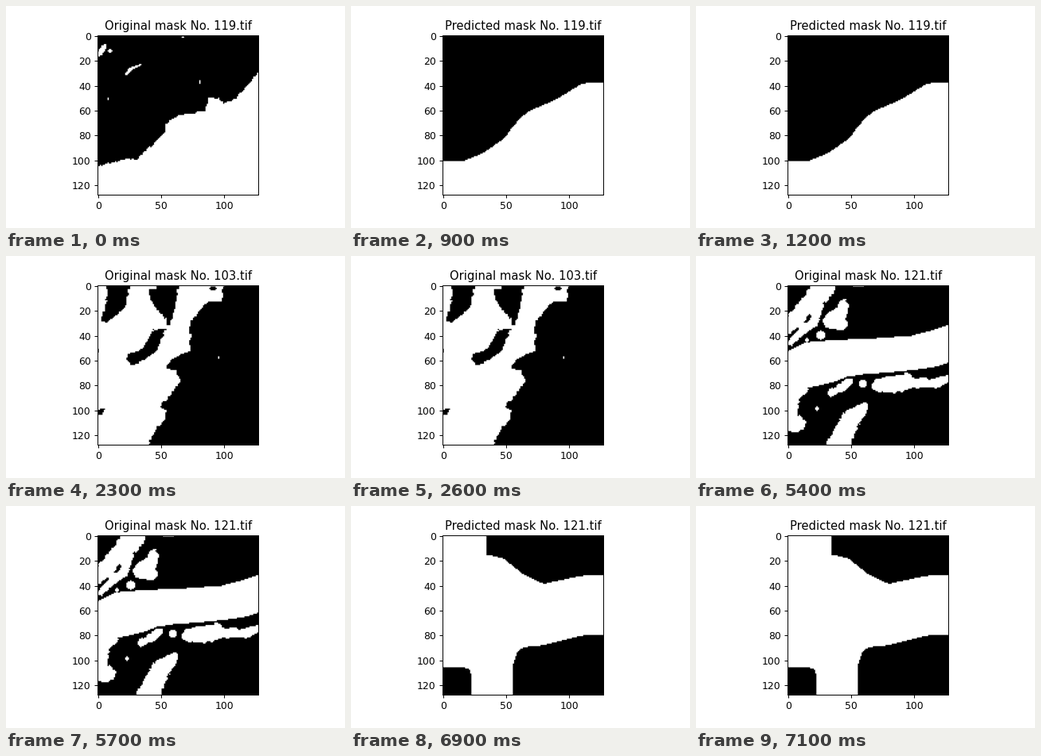
These frames come from a looping animation (426x280 px, 8000 ms). A matplotlib script:

```python
import numpy as np
import matplotlib.pyplot as plt
from matplotlib.animation import FuncAnimation

WIDTH, HEIGHT, DPI = 426, 280, 100
LEFT, RIGHT, TOP, BOTTOM = 115.4, 317.4, 37.1, 237.7
SIZE = 128
SCALE = 0.888          # point sizes relative to the matplotlib defaults
INTERVAL, FRAMES = 100, 80

index = np.arange(SIZE)
rows, cols = np.meshgrid(index, index, indexing="ij")

# Blocky noise that gives hand-labelled outlines their ragged edge
rng = np.random.default_rng(4)
grain = np.kron(rng.uniform(-0.8, 0.8, (43, 43)), np.ones((3, 3)))
grain = grain[:SIZE, :SIZE]


def blank(value):
    return np.full((SIZE, SIZE), float(value))


def curve(*points, smooth=1):
    """Value at each index along (position, value) points, optionally softened."""
    line = np.interp(index, *zip(*points))
    padded = np.pad(line, smooth // 2, mode="edge")
    return np.convolve(padded, np.ones(smooth) / smooth, mode="valid")


def stroke(mask, value, *points, rough=1):
    """Brush through (x, y, radius) points."""
    steps = np.linspace(0, len(points) - 1, 12 * len(points))
    path = [np.interp(steps, range(len(points)), p) for p in zip(*points)]
    for x, y, r in zip(*path):
        mask[np.hypot(cols - x, rows - y) < r + rough * grain] = value


def ellipse(mask, value, x, y, rx, ry, tilt=0):
    c, s = np.cos(np.radians(tilt)), np.sin(np.radians(tilt))
    u, v = cols - x, rows - y
    mask[np.hypot((u * c + v * s) / rx, (v * c - u * s) / ry) < 1] = value


def original_119():
    m = blank(0)
    shore = curve((0, 105), (12, 101), (24, 98.5), (30, 100), (53, 78),
                  (54, 71), (62, 65), (85, 60), (88, 50), (96, 50),
                  (100, 54), (110, 50), (127, 30))
    m[rows > shore + grain] = 1
    ellipse(m, 1, 3, 11.5, 2.2, 5.5, 30)
    ellipse(m, 1, 9.5, 12, 1.6, 2)
    stroke(m, 1, (22.5, 30.5, 1.2), (26, 26.5, 1.2), (34, 23, 0.7), rough=0)
    ellipse(m, 1, 67.5, 1, 1.1, 1.1)
    ellipse(m, 1, 81, 37, 0.9, 1.2)
    ellipse(m, 1, 8, 50.5, 1, 1.5)
    return m


def predicted_119():
    shore = curve((15, 101), (32, 94), (49, 82), (56, 72), (67, 61),
                  (90, 51), (111, 38), smooth=7)
    return (rows >= shore).astype(float)


def original_103():
    m = blank(1)
    shore = curve((0, 100), (12, 98), (13, 87), (27, 75), (34, 72),
                  (38, 73.5), (52, 73), (58, 60), (66, 54), (68, 62),
                  (76, 66), (88, 57), (97, 49), (100, 54), (107, 54),
                  (114, 46), (127, 40))
    m[cols > shore[:, None] + grain] = 0
    stroke(m, 0, (16, 0, 9), (15, 11, 8), (10, 21, 5.5), (4, 27, 2.5))
    stroke(m, 0, (51.5, 0, 12), (52, 8, 10.5), (56, 23, 3.5), (56, 30, 1.5))
    stroke(m, 0, (53, 35, 1), (46, 40, 5), (43, 48, 5), (36, 55, 4),
           (28, 59, 5))
    stroke(m, 0, (1, 102, 2.3), (4, 99, 1.2))
    ellipse(m, 0, 0, 52, 0.8, 1.6)
    ellipse(m, 0, 91.5, 2, 3.5, 1.3)
    ellipse(m, 1, 43, 1, 4, 1.8)
    ellipse(m, 1, 96, 57.5, 0.7, 0.7)
    return m


def predicted_103():
    shore = curve((17, 94.5), (46, 80.5), (50, 73), (55, 67.5), (62, 64),
                  (80, 61), (94, 57.5), (109, 52.5), smooth=5)
    return (cols < shore[:, None]).astype(float)


def original_121():
    m = blank(0)
    upper = curve((0, 52), (12, 46), (20, 44.5), (47, 43), (70, 42),
                  (98, 40), (113, 36), (127, 31.5))
    lower = curve((0, 85), (25, 80), (37, 77), (47, 73), (60, 71),
                  (85, 69), (104, 67), (117, 65), (127, 62))
    m[(rows > upper) & (rows < lower)] = 1

    # Patches above the band
    stroke(m, 1, (29, 0, 9), (22, 9, 8), (15, 17, 7), (6, 27, 7), (0, 33, 5))
    stroke(m, 1, (23, 16, 5), (20, 29, 4), (10, 37, 3), (1, 46, 2.5))
    stroke(m, 1, (44, 15, 4), (42, 22, 5), (35, 25, 4), (32, 29, 4.5),
           (42, 31, 5))
    ellipse(m, 0, 16.5, 25, 1.5, 2.5, 30)
    ellipse(m, 1, 26, 39.5, 3.6, 3.6)
    ellipse(m, 1, 15, 43.5, 1.8, 1.8)
    ellipse(m, 1, 56, 0, 4.5, 1)

    # Patches below the band
    stroke(m, 1, (72, 80, 5), (82, 79.5, 6.5), (94, 77, 6.5), (101, 78, 4),
           (118, 78, 3.5), (125, 76, 3.5), (128, 74, 2))
    stroke(m, 1, (34, 86, 2.5), (42, 82, 3.5), (49, 77, 3))
    stroke(m, 1, (14, 84, 2), (5, 87, 5), (2, 97, 5.5), (3, 106, 5),
           (8, 111, 6), (3, 113, 4))
    stroke(m, 1, (39, 130, 9), (46, 115, 8), (50, 107, 7.5), (61, 97, 3.5))
    ellipse(m, 1, 59.5, 78.5, 3.3, 3.3)
    ellipse(m, 1, 23, 98.5, 1.8, 1.8)
    return m


def predicted_121():
    m = blank(1)
    upper = curve((35, 15), (48, 18), (64, 31), (80, 38.5), (110, 32),
                  smooth=5)
    lower = curve((56, 104), (58, 95), (61, 91), (67, 89), (78, 88),
                  (111, 80), smooth=3)
    m[(cols >= 35) & (rows < upper)] = 0
    m[(cols >= 56) & (rows >= lower)] = 0
    m[(cols / 22.5) ** 8 + ((SIZE - rows) / 22.5) ** 8 < 1] = 0
    return m


# Start time in ms, title and mask of each slide
slides = [
    (0, "Original mask No. 119.tif", original_119()),
    (900, "Predicted mask No. 119.tif", predicted_119()),
    (2300, "Original mask No. 103.tif", original_103()),
    (3700, "Predicted mask No. 103.tif", predicted_103()),
    (5400, "Original mask No. 121.tif", original_121()),
    (6900, "Predicted mask No. 121.tif", predicted_121()),
]

plt.rcParams.update({
    "font.family": "DejaVu Sans",
    "axes.linewidth": 0.8 * SCALE,
    "axes.titlepad": 5.7 * SCALE,
})
fig = plt.figure(figsize=(WIDTH / DPI, HEIGHT / DPI), dpi=DPI,
                 facecolor="white")
ax = fig.add_axes([LEFT / WIDTH, 1 - BOTTOM / HEIGHT,
                   (RIGHT - LEFT) / WIDTH, (BOTTOM - TOP) / HEIGHT])
image = ax.imshow(slides[0][2], cmap="gray", vmin=0, vmax=1, aspect="auto")
title = ax.set_title(slides[0][1], fontsize=12 * SCALE)
ax.set_xticks(range(0, SIZE, 50))
ax.set_yticks(range(0, SIZE, 20))
ax.tick_params(labelsize=10 * SCALE, length=3.5 * SCALE, pad=3.5 * SCALE,
               width=0.8 * SCALE)


def update(frame):
    now = frame * INTERVAL
    _, text, mask = [s for s in slides if s[0] <= now][-1]
    image.set_data(mask)
    title.set_text(text)
    return image, title


anim = FuncAnimation(fig, update, frames=FRAMES, interval=INTERVAL,
                     repeat=True, repeat_delay=0, blit=False)
plt.show()
```
